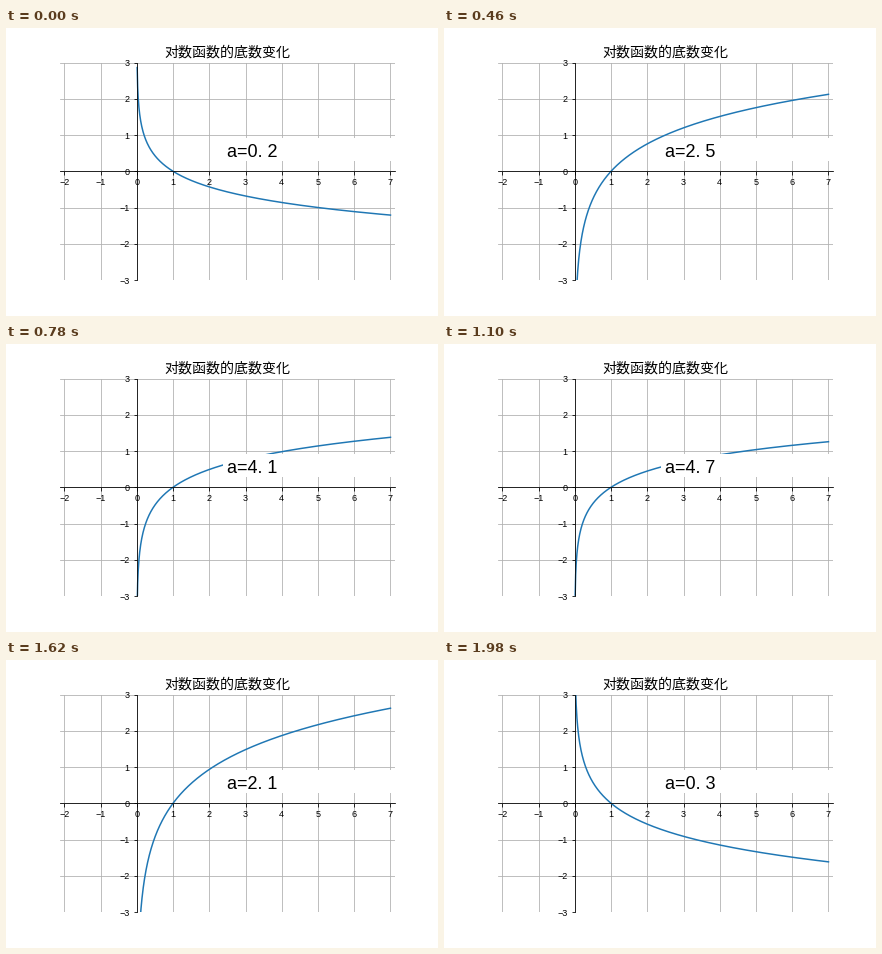
A matplotlib script that plays this animation: 432 px wide and 288 px high, repeating every 2 s.

```python
import matplotlib.pyplot as plt
import numpy as np
from matplotlib.animation import FuncAnimation
from matplotlib.patches import Rectangle

FRAMES = 100
INTERVAL = 20

plt.rcParams["font.family"] = "Liberation Sans"

fig = plt.figure(figsize=(6, 4), dpi=72)
ax = fig.add_axes([0.125, 0.125, 0.775, 0.755])

# Equal units on both axes, with 9 units of x centred in the width
half = 3 * (0.775 * 6) / (0.755 * 4)
ax.set_xlim(2.5 - half, 2.5 + half)
ax.set_ylim(-3, 3)
ax.set_xticks(range(-2, 8))
ax.set_yticks(range(-3, 4))
ax.tick_params(labelsize=9)
ax.grid(True)

for side in ("top", "right"):
    ax.spines[side].set_visible(False)
for side in ("bottom", "left"):
    ax.spines[side].set_position(("data", 0))

ax.set_title("对数函数的底数变化", fontsize=14, family="Noto Sans CJK JP")

x = np.linspace(0.01, 7, 1000)
curve, = ax.plot([], [], color="#1f77b4", lw=1.5)

# White strip behind the label, running to the right edge
ax.add_patch(Rectangle((2.39, 0.28), 6, 0.64, fc="white", ec="none", zorder=2.8))
label = ax.text(2.5, 0.4, "", fontsize=18, zorder=3)


def base(k):
    """Base rises from 0.2 to 5.2 and falls back in steps of 0.1."""
    return 0.2 + 0.1 * min(k, FRAMES - k)


def update(k):
    a = base(k)
    # The tiny offset turns base 1 into a vertical line
    curve.set_data(x, np.log(x) / np.log(a + 1e-9))
    whole, tenth = f"{a:.1f}".split(".")
    label.set_text(f"a={whole}. {tenth}")
    return curve, label


anim = FuncAnimation(fig, update, frames=FRAMES, interval=INTERVAL,
                     repeat=True, repeat_delay=0)
plt.show()
```
